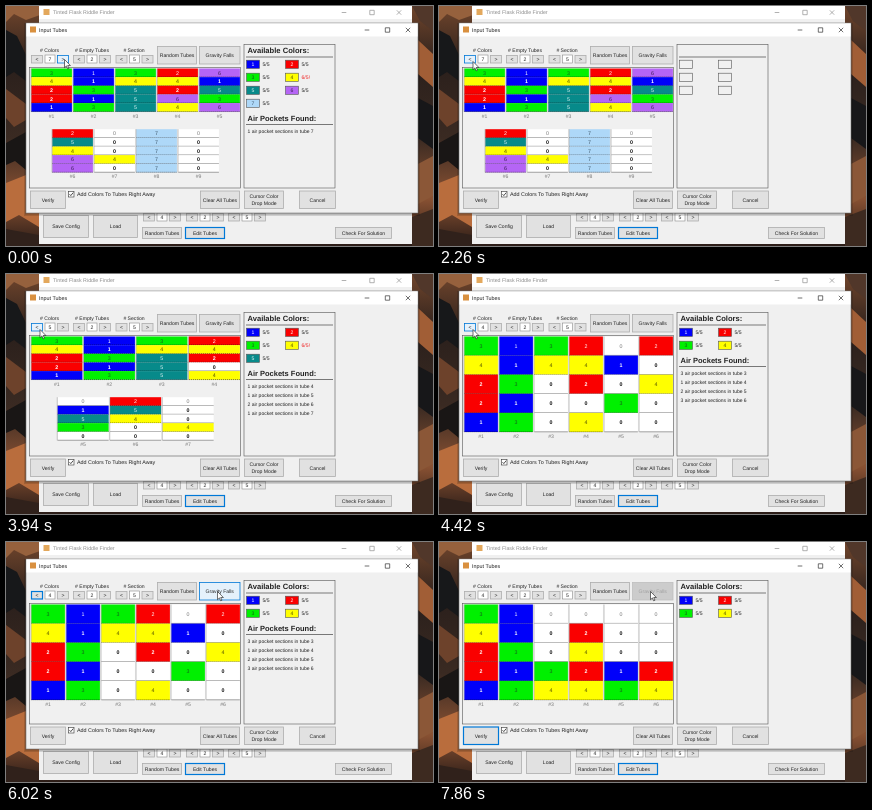
Write an HTML page that moves like this. It is 427 px wide and 240 px high and loops after 8 s.

```html
<!DOCTYPE html>
<html lang="en">
<head>
<meta charset="utf-8">
<title>Input Tubes</title>
<style>
html, body { margin: 0; width: 100%; height: 100%; overflow: hidden; background: #211a17; }
svg { display: block; width: 100vw; height: 100vh; }
text { font-family: "Liberation Sans", Arial, sans-serif; text-rendering: geometricPrecision; }
</style>
</head>
<body>
<svg viewBox="0 0 427 240">
  <defs>
    <linearGradient id="wall" x2="0" y2="1">
      <stop offset="0" stop-color="#70452c"/>
      <stop offset=".25" stop-color="#2b201c"/>
      <stop offset=".55" stop-color="#3a2a22"/>
      <stop offset=".8" stop-color="#8a5233"/>
      <stop offset="1" stop-color="#2a1c17"/>
    </linearGradient>
  </defs>
  <g id="desk"></g>
  <g id="back"></g>
  <g id="front"></g>
  <g id="live"></g>
  <path id="cursor" d="M0 0V8.2L1.9 6.4 3.2 9.3 4.5 8.7 3.2 6H5.9Z" fill="#fff" stroke="#111" stroke-width=".6"/>
</svg>
<script>
const LOOP = 8000;
const SECTIONS = 5;
const TUBES = ["34221", "11313", "34555", "24264", "61536", "25466", "00040", "77777", "00000"]
  .map(s => [...s].map(Number));
const FILL = ["#fff", "#0000fa", "#fa0000", "#00f000", "#ffff00", "#078a8a", "#b565f5", "#aed8f8"];
const INK = ["#111", "#fff", "#fff", "#14601a", "#4c4a00", "#e4f4f4", "#40205c", "#3c5468"];
const BLUE = "#0078d7";

// panel, shown, cap, step: colour counts used by each part while it repaints
const STAGES = [
  { t: 0, panel: 7, shown: 7, cap: 7, step: 7 },
  { t: 2260, panel: 6, shown: 7, cap: 7, step: 7, hollow: true },
  { t: 2340, panel: 6, shown: 6, cap: 7, step: 7, split: true },
  { t: 2420, panel: 6, shown: 6, cap: 6, step: 6 },
  { t: 3060, panel: 5, shown: 5, cap: 6, step: 6, split: true },
  { t: 3140, panel: 5, shown: 5, cap: 5, step: 5 },
  { t: 4100, panel: 4, shown: 5, cap: 5, step: 5, hollow: true },
  { t: 4180, panel: 4, shown: 4, cap: 4, step: 5 },
  { t: 4260, panel: 4, shown: 4, cap: 4, step: 4 },
  { t: 6500, panel: 4, shown: 4, cap: 4, step: 4, fallen: true }
];
const MOVES = [
  { from: 500, to: 1300, a: [58.5, 53.5], b: [34, 55.5] },
  { from: 4700, to: 5780, a: [34, 55.5], b: [211.5, 49.5] }
];

const $ = id => document.getElementById(id);
const esc = s => String(s).replace(/</g, "&lt;").replace(/>/g, "&gt;");
const rect = (x, y, w, h, fill, more = "") =>
  `<rect x="${x}" y="${y}" width="${w}" height="${h}" fill="${fill}" ${more}/>`;
const path = (d, fill, more = "") => `<path d="${d}" fill="${fill}" ${more}/>`;
const line = (d, color, width = .6, more = "") =>
  path(d, "none", `stroke="${color}" stroke-width="${width}" ${more}`);
const text = (x, y, s, { size = 5.1, fill = "#222", anchor = "start", bold } = {}) =>
  `<text x="${x}" y="${y + size * .36}" font-size="${size}" fill="${fill}" text-anchor="${anchor}"` +
  `${bold ? ' font-weight="700"' : ""}>${esc(s)}</text>`;
const mid = (x, y, s, opt) => text(x, y, s, { ...opt, anchor: "middle" });
const box = (x, y, w, h, fill, edge, width = .6) =>
  rect(x + .5, y + .5, w - 1, h - 1, fill, `stroke="${edge}" stroke-width="${width}"`);

function button(x, y, w, h, label, look = "plain") {
  const [fill, edge, ink, width] = {
    plain: ["#e1e1e1", "#adadad", "#222", .8],
    hover: ["#e5f1fb", BLUE, "#222", .8],
    focus: ["#e1e1e1", BLUE, "#222", 1.2],
    off: ["#cccccc", "#bfbfbf", "#a0a0a0", .8]
  }[look];
  const rows = label.split("\n");
  return box(x, y, w, h, fill, edge, width) +
    rows.map((s, i) => mid(x + w / 2, y + h / 2 + (i - (rows.length - 1) / 2) * 6.4, s, { fill: ink })).join("");
}

const stepper = (x, y, value, left, right) =>
  button(x, y, 12, 8.5, "<", left) + box(x + 13.5, y - .5, 11, 9, "#fff", "#8a8a8a") +
  mid(x + 19, y + 4, value) + button(x + 26, y, 12, 8.5, ">", right);

const winKeys = (xs, y, color) =>
  line(`M${xs[0] - 2.3} ${y}h4.6M${xs[1] - 2.2} ${y - 2.2}h4.4v4.4h-4.4z` +
    `M${xs[2] - 2.2} ${y - 2.2}l4.4 4.4m0-4.4l-4.4 4.4`, color, .7);

function drawDesk() {
  return rect(0, 0, 427, 240, "url(#wall)") +
    path("M0 0H34V9L20 14 8 8 0 16Z", "#96613d") +
    path("M0 24L11 30 20 49V75L8 66 0 71Z", "#17181a") +
    path("M0 83L20 98V114L8 121 0 112Z", "#6d422b") +
    path("M0 137L20 126V164L9 155 0 159Z", "#191615") +
    path("M0 177L20 169V207H33V221L13 209 0 216Z", "#b96d3d") +
    path("M0 223L33 229V240H0Z", "#30211b") +
    path("M406 0H427V25L414 15Z", "#51372a") +
    path("M412 34L427 48V81L412 68Z", "#a15e36") +
    path("M412 92L427 100V143L412 132Z", "#171719") +
    path("M412 158L427 150V190L412 198Z", "#8b5737") +
    path("M406 211L427 203V240H406Z", "#3d2a20");
}

function drawBack() {
  return rect(33, 0, 373, 238, "#f0f0f0") + rect(33, 0, 373, 13, "#fff") +
    rect(37.5, 3, 6, 6, "#e3a85c") +
    text(47, 6.5, "Tinted Flask Riddle Finder", { size: 5.3, fill: "#8c8c8c" }) +
    winKeys([338, 366, 393], 6.5, "#909090") +
    [137, 180, 222].map((x, i) => stepper(x, 207, [4, 2, 5][i])).join("") +
    button(37, 209, 46, 23, "Save Config") + button(87, 209, 45, 23, "Load") +
    button(136, 221, 40, 12, "Random Tubes") +
    button(179, 221, 40, 12, "Edit Tubes", "focus") +
    button(329, 221, 57, 12, "Check For Solution");
}

function drawFront() {
  return rect(18, 17, 396, 193, "#000", 'opacity=".14"') +
    rect(19, 17, 394, 191.5, "#000", 'opacity=".2"') +
    box(19.5, 16.5, 393, 191, "#f0f0f0", "#777") + rect(20.5, 17.5, 391, 13, "#fff") +
    rect(24, 20.5, 6, 6, "#d9903f") +
    text(33, 24.2, "Input Tubes", { size: 5.4 }) +
    winKeys([361, 381.5, 402], 24, "#333") +
    mid(43.5, 44, "# Colors") + mid(86, 44, "# Empty Tubes") + mid(128, 44, "# Section") +
    stepper(67, 49, 2) + stepper(109.5, 49, 5) +
    button(151, 40, 40, 18.5, "Random Tubes") +
    box(23, 61, 212, 121.5, "#f0f0f0", "#555") + box(237.5, 38, 92, 144.5, "#f0f0f0", "#555") +
    box(62, 185, 6.5, 6.5, "#fff", "#333") + line("M63.5 188.2l1.3 1.4 2.4-3", "#222", .8) +
    text(71, 188.2, "Add Colors To Tubes Right Away", { size: 5.4 }) +
    button(194, 184.5, 40, 18.5, "Clear All Tubes") +
    button(238, 184.5, 40, 18.5, "Cursor Color\nDrop Mode") +
    button(293, 184.5, 37, 18.5, "Cancel");
}

function tubesFor(count, cap, fallen) {
  return TUBES.slice(0, count + 2).map(tube => {
    const kept = tube.map(c => c > cap ? 0 : c);
    return fallen ? [...kept.filter(c => !c), ...kept.filter(c => c)] : kept;
  });
}

function drawTubes(s) {
  const tubes = tubesFor(s.shown, s.cap, s.fallen);
  const single = tubes.length < 7;
  const perRow = single ? tubes.length : Math.ceil(tubes.length / 2);
  const pitch = 210 / perRow, high = single ? 19.1 : 8.65;
  return tubes.map((tube, i) => {
    const lower = i >= perRow;
    const inRow = lower ? tubes.length - perRow : perRow;
    const x = 129.6 + (i % perRow - inRow / 2) * pitch;
    const top = lower ? 123.2 : 62.5, w = pitch - 1.4, cx = x + pitch / 2;
    const cells = tube.map((c, k) => {
      const y = top + k * high, end = y + high;
      return rect(x + .7, y, w, high, FILL[c]) +
        line(`M${x + .7} ${end - .2}h${w}`, c ? "#111" : "#444", .5, c ? 'stroke-dasharray="1.2 .8"' : "") +
        mid(cx, y + high / 2, c, { size: 5.3, fill: !c && !k ? "#777" : INK[c], bold: k > 0 && c < 3 });
    }).join("");
    const bottom = top + high * SECTIONS;
    const gap = s.split && i > perRow ? rect(cx - 1.5, top, 2.8, high * SECTIONS, "#f4f4f4") : "";
    return cells + gap + line(`M${x + .4} ${top}V${bottom}`, "#777", .4) +
      mid(cx, bottom + 4.2, "#" + (i + 1), { fill: "#777" });
  }).join("");
}

function drawPanel(s) {
  const tubes = tubesFor(s.panel, s.panel, s.fallen), all = tubes.flat();
  let out = line("M240 51H327", "#444", .7);
  if (!s.hollow) out += text(241.5, 43.8, "Available Colors:", { size: 7.6, bold: true });
  for (let c = 1; c <= s.panel; c++) {
    const x = 240 + (c - 1) % 2 * 39, y = 58.3 + Math.floor((c - 1) / 2) * 13;
    out += box(x, y - 4.6, 14, 9.2, s.hollow ? "#f0f0f0" : FILL[c], "#555");
    if (s.hollow) continue;
    const n = all.filter(v => v === c).length, over = n > SECTIONS;
    out += mid(x + 7, y, c, { fill: INK[c] }) +
      text(x + 16.5, y, `${n}/${SECTIONS}${over ? "!" : ""}`, { fill: over ? "#f02020" : "#222" });
  }
  if (s.hollow) return out;
  const pockets = tubes.map((tube, i) => {
    const n = tube.slice(tube.findIndex(c => c)).filter(c => !c).length;
    return tube.some(c => c) && n ? `${n} air pocket sections in tube ${i + 1}` : "";
  }).filter(Boolean);
  if (!pockets.length) return out;
  const y = 60 + Math.ceil(s.panel / 2) * 13;
  out += text(241.5, y, "Air Pockets Found:", { size: 7.5, bold: true }) +
    line(`M240 ${y + 6.5}H327`, "#444", .7);
  return out + pockets.slice(0, s.split ? 1 : 9)
    .map((p, i) => text(241.5, y + 13 + i * 9.2, p, { size: 5 })).join("");
}

function drawKeys(s, t) {
  const onLeft = t >= 1060 && t < 4860;
  const left = onLeft ? "hover" : t >= 4860 && !s.fallen ? "focus" : "plain";
  const right = t < 660 ? "hover" : t < 2100 ? "focus" : "plain";
  const fall = s.fallen ? "off" : t >= 5580 ? "hover" : "plain";
  return stepper(25, 49, s.step, left, right) +
    button(193, 40, 41.5, 18.5, "Gravity Falls", fall) +
    button(24, 184.5, 36, 18.5, "Verify", s.fallen ? "focus" : "plain");
}

function cursorAt(t) {
  const m = t < MOVES[1].from ? MOVES[0] : MOVES[1];
  const p = Math.min(1, Math.max(0, (t - m.from) / (m.to - m.from)));
  const e = p * p * (3 - 2 * p);
  return m.a.map((v, i) => v + (m.b[i] - v) * e);
}

$("desk").innerHTML = drawDesk();
$("back").innerHTML = drawBack();
$("front").innerHTML = drawFront();

let last = "";
function frame() {
  const t = performance.now() % LOOP;
  const s = STAGES.findLast(g => g.t <= t);
  const html = drawTubes(s) + drawPanel(s) + drawKeys(s, t);
  if (html !== last) $("live").innerHTML = last = html;
  $("cursor").setAttribute("transform", `translate(${cursorAt(t)})`);
  requestAnimationFrame(frame);
}
frame();
</script>
</body>
</html>
```
